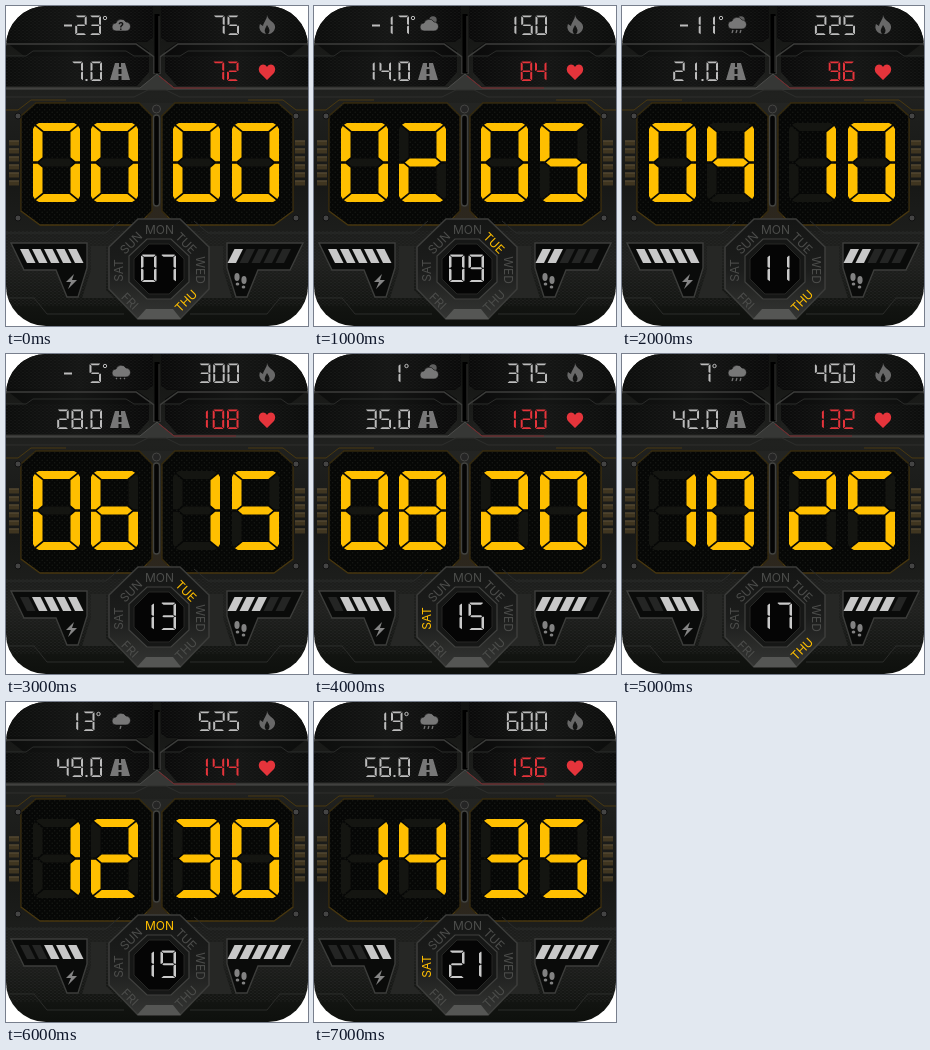
An HTML page that plays this animation: 302 by 320 pixels, repeating every 8000 ms.

```html
<!DOCTYPE html>
<html lang="en">
<head>
<meta charset="utf-8">
<title>Watch face</title>
<style>
  html, body { margin: 0; width: 100%; height: 100%; overflow: hidden; background: #fff }
  svg { display: block; width: 302px; height: 320px }
  text { font: 12px Inter, Arial, sans-serif; text-anchor: middle }
</style>
</head>
<body>
<svg viewBox="0 0 302 320">
  <defs>
    <clipPath id="face"><rect width="302" height="320" rx="40"/></clipPath>
    <linearGradient id="body" x2="0" y2="1">
      <stop stop-color="#121311"/><stop offset=".28" stop-color="#20211f"/>
      <stop offset=".55" stop-color="#171816"/><stop offset=".8" stop-color="#20211f"/>
      <stop offset=".94" stop-color="#121411"/><stop offset="1" stop-color="#0e100d"/>
    </linearGradient>
    <linearGradient id="steel" x2="0" y2="1">
      <stop stop-color="#151615"/><stop offset=".5" stop-color="#1c1d1c"/><stop offset="1" stop-color="#343533"/>
    </linearGradient>
    <linearGradient id="shade" x2="1" y2="0">
      <stop stop-color="#0c0d0c"/><stop offset=".5" stop-color="#151615"/><stop offset="1" stop-color="#0a0a0a"/>
    </linearGradient>
    <linearGradient id="post" x2="0" y2="1">
      <stop stop-color="#232422"/><stop offset=".6" stop-color="#272623"/><stop offset="1" stop-color="#2e271c"/>
    </linearGradient>
    <pattern id="dots" width="5" height="5" patternUnits="userSpaceOnUse">
      <circle cx="1.2" cy="1.2" r=".7" fill="#171815"/><circle cx="3.7" cy="3.7" r=".7" fill="#171815"/>
    </pattern>
    <pattern id="weave" width="4" height="3" patternUnits="userSpaceOnUse">
      <path d="M0 .5h2M2 2h2" stroke="#2a2b29" stroke-width=".7"/>
    </pattern>
  </defs>
  <g clip-path="url(#face)">
    <rect width="302" height="320" fill="url(#body)"/>
    <rect y="225" width="302" height="75" fill="url(#weave)" opacity=".7"/>
    <g id="half">
      <path d="M0 0H147V32L141 36H0Z" fill="url(#shade)"/>
      <path d="M0 36H130L143 45V66L131 80H0V50H18" fill="url(#shade)"/>
      <path d="M0 0H147V35H0ZM0 50H143V80H0Z" fill="url(#weave)" opacity=".4"/>
      <path d="M0 38H130L148 51V68" fill="none" stroke="#3c3d3b" stroke-width="1.5"/>
      <path d="M0 50H20L27 45H120L128 50H145" fill="none" stroke="#2b2c2a"/>
      <path d="M0 82H134L151 68V84H0Z" fill="#363735"/>
      <path d="M0 82H134L151 68" fill="none" stroke="#4c4d4b"/>
      <path d="M0 91H128L142 84H151" fill="none" stroke="#2e2f2d"/>
      <path d="M132 97H151V219H132L146 205V110Z" fill="url(#post)"/>
      <path id="screen" d="M30 97H133L146 110V205L132 219H34L15 205V110Z" fill="#060706" stroke="#33290f" stroke-width="1.5"/>
      <use href="#screen" style="fill:url(#dots)"/>
      <path d="M30 97H133L146 110V205L132 219H34L15 205V110Z" fill="url(#dots)"/>
      <path d="M0 104H12L25 94H60M15 205L34 219H132L141 210" fill="none" stroke="#4a3910"/>
      <path d="M3 137h10m-10 8h10m-10 8h10m-10 8h10m-10 8h10m-10 8h10" stroke="#3f3520" stroke-width="5"/>
      <path d="M3 135h10m-10 8h10m-10 8h10m-10 8h10m-10 8h10m-10 8h10" stroke="#5c5038"/>
      <circle cx="12" cy="110" r="3" fill="#444" stroke="#111"/>
      <circle cx="12" cy="212" r="3" fill="#444" stroke="#111"/>
      <path d="M0 227H100L114 215M0 292H28L41 308H118" fill="none" stroke="#2b2c2a"/>
      <path d="M5 237H81V262L72 291H61L50 264H18Z" fill="#0a0b0a" stroke="#3c3d3b" stroke-width="1.4"/>
      <path d="M85 240H100V284L108 292H76L85 264Z" fill="#262725"/>
    </g>
    <use href="#half" transform="translate(302) scale(-1 1)"/>
    <path d="M151 8V67" stroke="#000" stroke-width="5"/>
    <path d="M153 10V66" stroke="#363735"/>
    <path d="M153 70L168 82H230" fill="none" stroke="#7a2529"/>
    <rect x="147.500" y="109" width="6" height="91" rx="3" fill="#050505" stroke="#41423f" stroke-width="1.4"/>
    <circle cx="150.500" cy="103" r="4" fill="#252525" stroke="#464644"/>
    <path d="M132 213H174L203 241V283L174 313H132L103 283V241Z" fill="url(#steel)" stroke="#3c3d3b" stroke-width="1.5"/>
    <path d="M140 303H167L175 313H131Z" fill="#555654"/>
    <path d="M141 233H165L183 250V276L165 293H141L123 276V250Z" fill="#161716" stroke="#40413f" stroke-width="1.2"/>
    <path d="M143 238H163L178 253V273L163 288H143L128 273V253Z" fill="#050505" stroke="#262725"/>
    <path d="M68 268L60 276H65L62 283L71 274H66Z" fill="#858585"/>
    <g fill="#828282">
      <ellipse cx="231" cy="271" rx="2.600" ry="4"/><ellipse cx="231.500" cy="278" rx="1.800" ry="1.600"/>
      <ellipse cx="238" cy="274" rx="2.600" ry="4"/><ellipse cx="237.500" cy="281" rx="1.800" ry="1.600"/>
    </g>
    <path d="M261 9C262 15 270 16 269 22C268 26 265 28 262 28C265 25 263 22 261 19C260 22 257 24 260 28C255 27 252 23 254 18L257 20C258 15 261 14 261 9Z" fill="#686868"/>
    <path d="M261 74L254 67C250 61 257 55 261 61C265 55 272 61 268 67Z" fill="#e5343b"/>
    <path d="M109 57H113V61H115V57H119L124 74H115.500V70H112.500V74H104ZM112.500 63V68H115.500V63Z" fill="#777" fill-rule="evenodd"/>
    <g id="live"></g>
  </g>
</svg>
<script>
const GOLD = '#ffbf00', GREY = '#bcbcbc', RED = '#e5343b', WHITE = '#cacaca';
const LIT = {
  0: 'abcdef', 1: 'bc', 2: 'abdeg', 3: 'abcdg', 4: 'bcfg',
  5: 'acdfg', 6: 'acdefg', 7: 'abc', 8: 'abcdefg', 9: 'abcdfg'
};
const DAYS = [
  ['SUN', 125, 237, -45], ['MON', 153.5, 224, 0], ['TUE', 180, 237, 45], ['WED', 194, 264, 90],
  ['THU', 180, 295, -45], ['FRI', 124, 295, 45], ['SAT', 113, 264.5, -90]
];
const SKY = ['unknown', 'sun', 'sun rain', 'snow', 'sun', 'rain', 'drizzle', 'rain'];
const live = document.getElementById('live');

const poly = (points, fill) => `<polygon points="${points.join(' ')}" fill="${fill}"/>`;
const pad = n => String(n).padStart(2, '0');

// One seven-segment digit: t is the upright stroke, s the level one,
// g the gap at the mitres and c the cut of the outer corners.
function digit(char, x, y, w, h, t, color, off) {
  const s = t * .85, g = t > 4 ? 1.2 : .5, c = t * .5, m = h / 2, r = s / 2;
  const near = (c - g) / 2, far = (c + g) / 2;
  const top = [[c + g, 0], [w - c - g, 0], [w - far, near], [w - t - g, s], [t + g, s], [far, near]];
  const side = [[0, c + g], [near, far], [t, s + g], [t, m - r - g], [t / 2, m - g], [0, m - g]];
  const flipX = p => p.map(([a, b]) => [w - a, b]);
  const flipY = p => p.map(([a, b]) => [a, h - b]);
  const shapes = {
    a: top, d: flipY(top), f: side, b: flipX(side), e: flipY(side), c: flipY(flipX(side)),
    g: [[t / 2 + g, m], [t + g, m - r], [w - t - g, m - r], [w - t / 2 - g, m], [w - t - g, m + r], [t + g, m + r]]
  };
  return Object.entries(shapes).map(([name, pts]) => {
    const fill = LIT[char].includes(name) ? color : off;
    return fill ? poly(pts.map(([a, b]) => [x + a, y + b]), fill) : '';
  }).join('');
}

// The thin face sets its 1 a stroke further left.
const thin = (char, x, y, w, h, t, color) => digit(char, char === '1' ? x - t : x, y, w, h, t, color);

// Small digits, the last one ending at the given right edge.
function small(value, right, y, color = GREY) {
  const chars = [...String(value)];
  return chars.map((c, i) =>
    thin(c, right - 11.5 - (chars.length - 1 - i) * 14.3, y, 11.5, 19.5, 2, color)).join('');
}

function bars(x, lean, lit) {
  return [0, 1, 2, 3, 4].map(i => {
    const a = x + i * 12;
    return poly([[a - lean, 243], [a + 8.5 - lean, 243], [a + 8.5 + lean, 257], [a + lean, 257]],
      lit(i) ? '#c8c8c8' : '#242524');
  }).join('');
}

function weather(sky) {
  const has = word => sky.includes(word);
  const drops = has('drizzle') ? [115] : has('rain') || has('snow') ? [111, 115, 119] : [];
  let out = has('sun') ? '<circle cx="119" cy="14" r="3.700" fill="#606060"/>' : '';
  out += `<path transform="translate(0 ${drops.length ? -2 : 0})" fill="#777" stroke="#0d0d0d" stroke-width=".6"
    d="M110 25a4 4 0 0 1 0-8a5.500 5.500 0 0 1 10-1a4.500 4.500 0 0 1 0 9z"/>`;
  if (has('unknown')) out += '<text x="115" y="24" fill="#111" style="font-size:10px;font-weight:bold">?</text>';
  return out + drops.map(x =>
    `<path d="M${x} 24l-1 ${has('snow') ? 1 : 3}" stroke="#777" stroke-width="1.300"/>`).join('');
}

function draw(k) {
  const temp = -23 + 6 * k, right = temp < 0 ? 95 : 88.5;
  const date = 7 + 2 * k;
  const today = new Date(2021, k, date).getDay();
  const clock = pad(2 * k) + pad(5 * k);
  const battery = 5 - Math.max(0, (k - 1) >> 1);
  const steps = 1 + Math.floor((2 * k + 1) / 3);
  live.innerHTML =
    (temp < 0 ? poly([[58, 18.5], [66, 18.5], [66, 20.5], [58, 20.5]], GREY) : '') +
    small(Math.abs(temp), right, 9.5) +
    `<circle cx="${right + 4}" cy="12" r="1.700" fill="none" stroke="${GREY}"/>` +
    weather(SKY[k]) +
    small(75 * (k + 1), 233, 9.5) +
    small(7 * (k + 1), 77, 55.5) + `<rect x="79.500" y="73" width="2" height="2" fill="${GREY}"/>` + small(0, 96, 55.5) +
    small(72 + 12 * k, 232.5, 55.5, RED) +
    [27, 85, 167, 226].map((x, i) => digit(clock[i], x, 117, 47, 79, 9.5, GOLD, '#141511')).join('') +
    [...pad(date)].map((c, i) => thin(c, 135 + i * 19.5, 248.5, 15.5, 27.5, 2.5, WHITE)).join('') +
    DAYS.map(([name, x, y, turn], i) =>
      `<text transform="translate(${x} ${y}) rotate(${turn})" y="4.300" fill="${i === today ? GOLD : '#4c4d4b'}">${name}</text>`).join('') +
    bars(17.5, 3.5, i => i >= 5 - battery) +
    bars(225, -3.5, i => i < steps);
}

let shown = -1;
function tick() {
  const k = Math.floor(performance.now() / 1000) % 8;
  if (k !== shown) draw(shown = k);
  requestAnimationFrame(tick);
}
tick();
</script>
</body>
</html>
```
